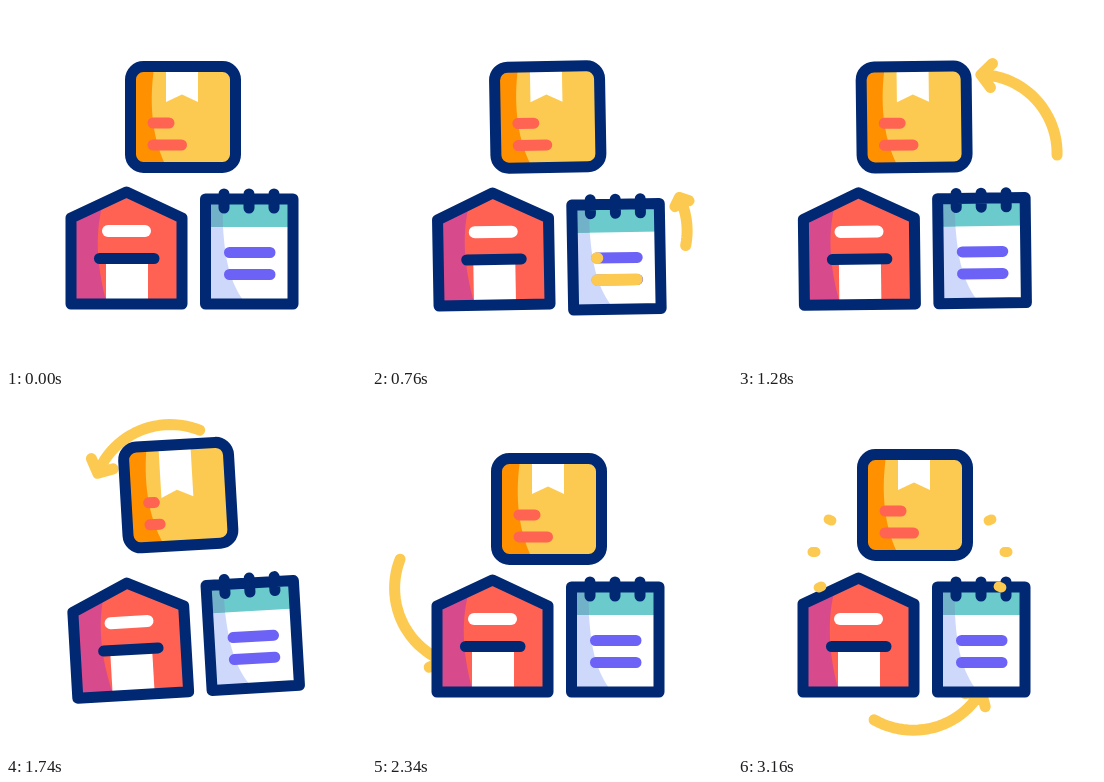
Recreate the animation shown at these times as an HTML page. Size 360 by 360 pixels, loop 3180 ms.

```html
<!DOCTYPE html>
<html lang="en">
<head>
<meta charset="utf-8">
<title>Order to warehouse loop</title>
<style>
  html, body { margin: 0; width: 100%; height: 100%; overflow: hidden; background: #fff; }
  svg { display: block; width: 100vw; height: 100vh; }
  path { fill: none; stroke-linecap: round; stroke-linejoin: round; }
  .ink { stroke: #002873; stroke-width: 11; }
  .sun { stroke: #fdca51; stroke-width: 11; }
  .coral { stroke: #ff6351; stroke-width: 11; }
  .violet { stroke: #6c63f6; stroke-width: 11; }
  .glass { stroke: #fff; stroke-width: 12; }
</style>
</head>
<body>
<svg viewBox="0 0 360 360">
  <path id="arrow" class="sun"/>
  <g id="scene">
    <g id="pad">
      <path d="M199.5 193H287V298H199.5Z" style="fill:#fff"/>
      <path d="M199.5 221H217C219 252 223 276 240 298H199.5Z" style="fill:#ced8fb"/>
      <path d="M199.5 193H287V221H199.5Z" style="fill:#6bcbcc"/>
      <path d="M199.5 193H218Q216 207 217 221H199.5Z" style="fill:#72b2c8"/>
      <path class="ink" d="M199.5 193H287V298H199.5ZM218 188V202M243 188V202M268 188V202"/>
      <path class="violet" d="M223.5 246.5H264M223.5 268.5H264"/>
      <path id="notes" class="sun" style="stroke-width:11.6"/>
    </g>
    <g id="house">
      <path id="wall" style="fill:#ff6252"/>
      <path id="shade" style="fill:#d74b8c"/>
      <path d="M100 253H142V298H100Z" style="fill:#fff"/>
      <path id="frame" class="ink"/>
      <path id="lintel" class="ink"/>
      <path id="window" class="glass"/>
    </g>
  </g>
  <path id="sparks" class="sun" style="stroke-width:10"/>
  <g id="boxTurn">
    <g id="box">
      <rect x="124.5" y="60.5" width="105" height="101" rx="13" fill="#fdca51"/>
      <path d="M128 62H148C144 91 144 128 160 160H128Z" style="fill:#ff9100"/>
      <path id="ribbon" style="fill:#fff"/>
      <path id="labels" class="coral"/>
      <rect class="ink" x="124.5" y="60.5" width="105" height="101" rx="13" fill="none"/>
    </g>
  </g>
</svg>
<script>
const LOOP = 3180, STEP = 20, CX = 175, CY = 183;
const el = id => document.getElementById(id);
const draw = (id, d) => el(id).setAttribute('d', d);
const move = (id, v) => el(id).setAttribute('transform', v);

// Sine ease from 0 to 1 between two times.
const ease = (t, from, to) => {
  const s = Math.min(1, Math.max(0, (t - from) / (to - from)));
  return (1 - Math.cos(Math.PI * s)) / 2;
};
// Up to 1 at the peak and back to 0.
const pulse = (t, from, peak, to) => ease(t, from, peak) - ease(t, peak, to);

// The whole group rocks left, right, left and settles.
const tilt = t => -4 * ease(t, 200, 590) + 9 * pulse(t, 590, 1025, 1460) + 4 * ease(t, 1560, 2220);

function arrowPath(t) {
  const span = ease(t, 690, 850);
  if (!span) return '';
  const head = -135 - 176 * Math.sin((t - 1780) / 1124);
  const out = 28 * (ease(t, 690, 765) - 1);
  const at = u => {
    const a = (head + 46 * u) * Math.PI / 180;
    const r = 133 + 61 * u - 46 * u * u + out;
    return [CX + r * Math.cos(a), CY + r * Math.sin(a)];
  };
  const pts = Array.from({ length: 25 }, (_, i) => at(span * i / 24));
  const tip = pts[0], next = at(0.08);
  const back = Math.atan2(next[1] - tip[1], next[0] - tip[0]);
  const size = 16 * Math.sqrt(span);
  const wing = turn => [tip[0] + size * Math.cos(back + turn), tip[1] + size * Math.sin(back + turn)];
  return `M${pts.join('L')}M${wing(-0.85)}L${tip}L${wing(0.85)}`;
}

function sparkPath(t) {
  if (t < 2880) return '';
  const reach = 0.55 + 0.45 * ease(t, 2860, 3160);
  const half = 1.5 + 6 * pulse(t, 2860, 3000, 3160);
  const ray = (x, y) => {
    const k = half / Math.hypot(x, y);
    const p = f => `${172 + x * f} ${158 + y * f}`;
    return `M${p(reach - k)}L${p(reach + k)}`;
  };
  return [-1, 1].map(side => ray(80 * side, -32) + ray(96 * side, 0) + ray(90 * side, 35)).join('');
}

const noteLine = (y, k) => k > 0.01 ? `M223.5 ${y}h${40.5 * k}` : '';

function render(t) {
  const turn = `rotate(${tilt(t)} ${CX} ${CY})`;
  move('scene', turn);
  move('boxTurn', turn);

  move('pad', `translate(0 ${6.5 * pulse(t, 450, 740, 1200)})`);
  draw('notes', noteLine(246.5, pulse(t, 300, 550, 780)) + noteLine(268.5, pulse(t, 400, 740, 980)));

  const hop = 5 * pulse(t, 2140, 2270, 2500) - 10 * pulse(t, 1400, 1760, 2140);
  move('box', `translate(0 ${hop})`);
  const low = 96 + 17 * pulse(t, 1400, 1740, 2200);
  draw('ribbon', `M160 62H192V${low}L176 ${low - 7.5}L160 ${low}Z`);
  const k = 1 - 0.66 * pulse(t, 1400, 1780, 2200);
  draw('labels', `M147 117h${16 * k}M147 139h${28.5 * k}`);

  const up = 18.5 * pulse(t, 2340, 2720, 3280), eave = 212 - up;
  const outline = `M65 298V${eave}L120.5 ${186 - up}L176 ${eave}V298Z`;
  draw('wall', outline);
  draw('frame', outline);
  draw('shade', `M65 298V${eave}L97 ${197 - up}C90 ${222 - up} 89 255 101 298Z`);
  const wide = pulse(t, 2340, 2740, 3140);
  draw('window', `M${102 - 14 * wide} 225H${139 + 14 * wide}`);
  draw('lintel', `M${93.5 - 6 * wide} 252.5H${148 + 6 * wide}`);

  draw('arrow', arrowPath(t));
  draw('sparks', sparkPath(t));
}

const start = performance.now();
function tick() {
  const t = (performance.now() - start) % LOOP;
  render(Math.floor(t / STEP) * STEP);
  requestAnimationFrame(tick);
}
tick();
</script>
</body>
</html>
```
